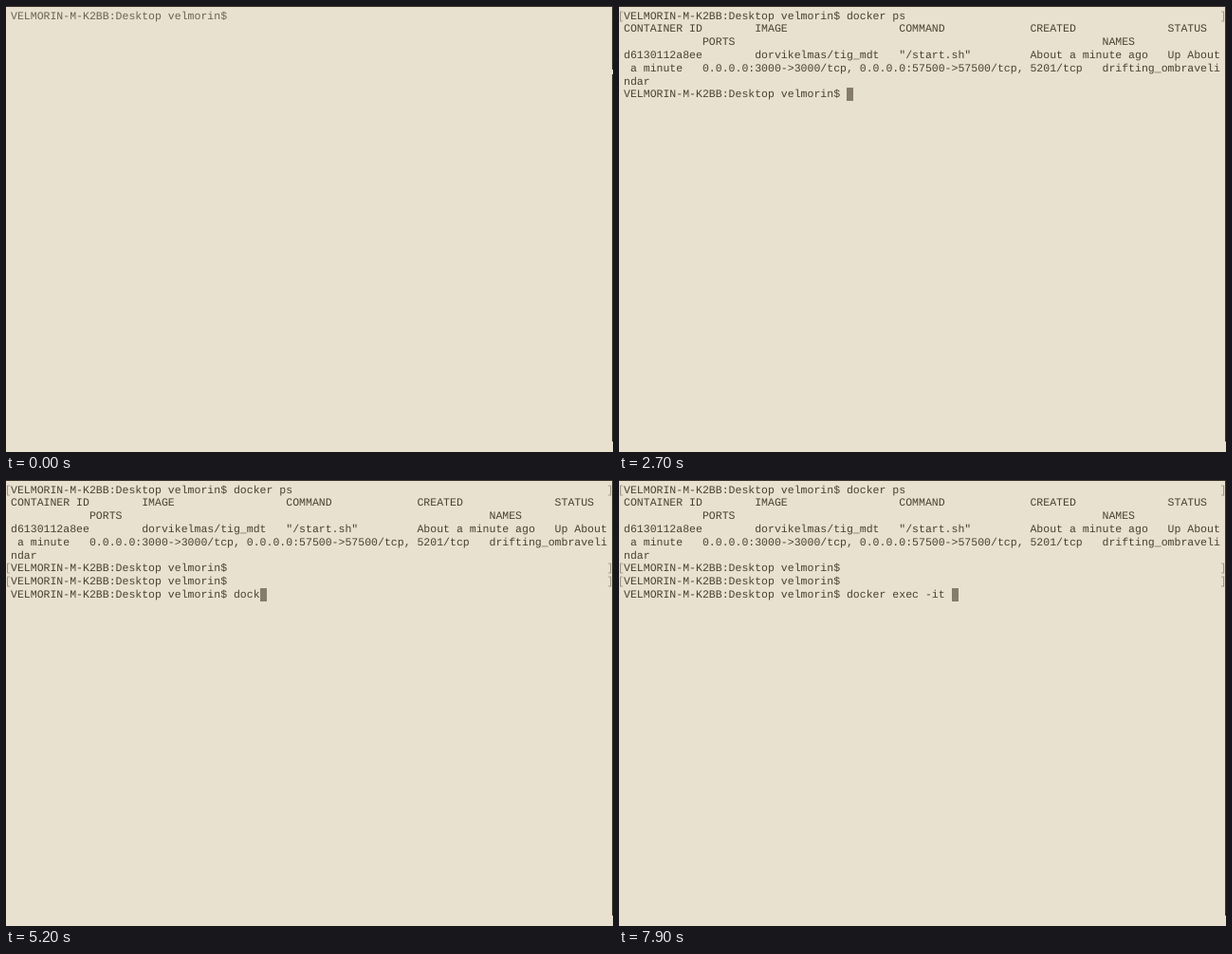
An HTML page for the animation above (8 s loop, 640 by 470 pixels).

```html
<!DOCTYPE html>
<html lang="en">
<head>
<meta charset="utf-8">
<title>Terminal</title>
<style>
  html, body { margin: 0; width: 100%; height: 100%; overflow: hidden; background: #e8e1cf; }
  #stage {
    position: relative; width: 640px; height: 470px; overflow: hidden;
    background: #e8e1cf; color: #4b4031;
    font: 11.52px/13.8px "Liberation Mono", "Courier New", monospace;
    font-variant-ligatures: none; text-rendering: geometricPrecision;
  }
  #stage div { position: absolute; white-space: pre; }
  #stage.faint { color: #6c6252; }
  .edge { background: #39332a; }
  .top { left: 0; top: 0; width: 640px; height: 1px; }
  .right { left: 639px; top: 0; width: 1px; height: 459px; }
  .gap { left: 639px; top: 67px; width: 1px; height: 5px; background: #f6f2e6; }
  .mark { color: #989080; }
  .block { background: #867c6b; }
  .select { background: #aea692; }
  .corner { left: 5px; width: 5px; height: 1px; background: #8d8473; }
  .corner::before { content: ""; position: absolute; width: 1px; height: 3px; background: inherit; }
  .high { top: 17px; }
  .low { top: 29px; }
  .low::before { bottom: 0; }
</style>
</head>
<body>
<div id="stage"></div>
<script>
const LOOP = 8000, LEFT = 5, TEXT_TOP = 4.5, BOX_TOP = 3.5, CELL = 6.913, ROW = 13.8;
const PROMPT = "VELMORIN-M-K2BB:Desktop velmorin$ ";
const ENTER_FIRST = 2160, OUTPUT_AT = 2260, SELECT_AT = 3400, ENTERS = [4300, 4500];
const FIRST = { text: "docker ps", times: [1400, 1490, 1580, 1670, 1760, 1850, 1940, 2020, 2100] };
const SECOND = {
  text: "docker exec -it ",
  times: [4700, 4800, 4900, 5160, 5300, 5400, 5500, 5700, 5800, 5900, 6000, 6400, 6800, 7200, 7400, 7800]
};

const stage = document.getElementById("stage");

function add(cls) {
  const el = document.createElement("div");
  el.className = cls;
  stage.append(el);
  return el;
}

function place(el, row, col, top) {
  el.style.left = LEFT + col * CELL + "px";
  el.style.top = top + row * ROW + "px";
}

function label(cls, row, col, text = "") {
  const el = add(cls);
  place(el, row, col, TEXT_TOP);
  el.textContent = text;
  return el;
}

function box(cls, row, col, cols) {
  const el = add(cls);
  place(el, row, col, BOX_TOP);
  el.style.width = cols * CELL + "px";
  el.style.height = ROW + "px";
  return el;
}

// Lay out [column, text] pairs on one line.
function fields(...pairs) {
  return pairs.reduce((line, [col, text]) => line.padEnd(col) + text, "");
}

const output = [
  fields([0, "CONTAINER ID"], [20, "IMAGE"], [42, "COMMAND"], [62, "CREATED"], [83, "STATUS"]),
  fields([12, "PORTS"], [73, "NAMES"]),
  fields([0, "d6130112a8ee"], [20, "dorvikelmas/tig_mdt"], [42, '"/start.sh"'],
    [62, "About a minute ago"], [83, "Up About"]),
  fields([1, "a minute"], [12, "0.0.0.0:3000->3000/tcp, 0.0.0.0:57500->57500/tcp, 5201/tcp"],
    [73, "drifting_ombraveli"]),
  "ndar"
];

const selection = box("select", 3, 0, 12);
const cursor = box("block", 6, PROMPT.length, 1);
const lines = Array.from({ length: 9 }, (_, row) => label("", row, 0));
// Brackets appear around a prompt once its line has been entered.
const marks = [0, 6, 7].map(row => [label("mark", row, -0.92, "["), label("mark", row, 90.9, "]")]);
const markTimes = [OUTPUT_AT, ...ENTERS];
const corners = [add("corner high"), add("corner low")];
add("edge top");
add("edge right");
const gap = add("gap");

const show = (el, on) => { el.style.visibility = on ? "visible" : "hidden"; };
const passed = (times, t) => times.filter(at => t >= at).length;
const typed = (cmd, t) => cmd.text.slice(0, passed(cmd.times, t));

function setLine(row, text) {
  if (lines[row].textContent !== text) lines[row].textContent = text;
}

function draw(t) {
  const ready = t >= OUTPUT_AT;
  const enters = passed(ENTERS, t);
  const command = typed(SECOND, t);

  stage.className = ready ? "" : "faint";
  setLine(0, PROMPT + typed(FIRST, t));
  output.forEach((text, i) => setLine(i + 1, ready ? text : ""));
  for (let i = 0; i < 3; i++) {
    setLine(6 + i, ready && i <= enters ? PROMPT + (i === 2 ? command : "") : "");
    marks[i].forEach(el => show(el, t >= markTimes[i]));
  }

  place(cursor, 6 + enters, PROMPT.length + command.length, BOX_TOP);
  show(cursor, ready);
  show(selection, t >= SELECT_AT && !enters);
  corners.forEach(el => show(el, t >= ENTER_FIRST && !ready));
  show(gap, !ready);
}

const start = performance.now();
function tick(now) {
  draw(Math.max(0, now - start) % LOOP);
  requestAnimationFrame(tick);
}
draw(0);
requestAnimationFrame(tick);
</script>
</body>
</html>
```
